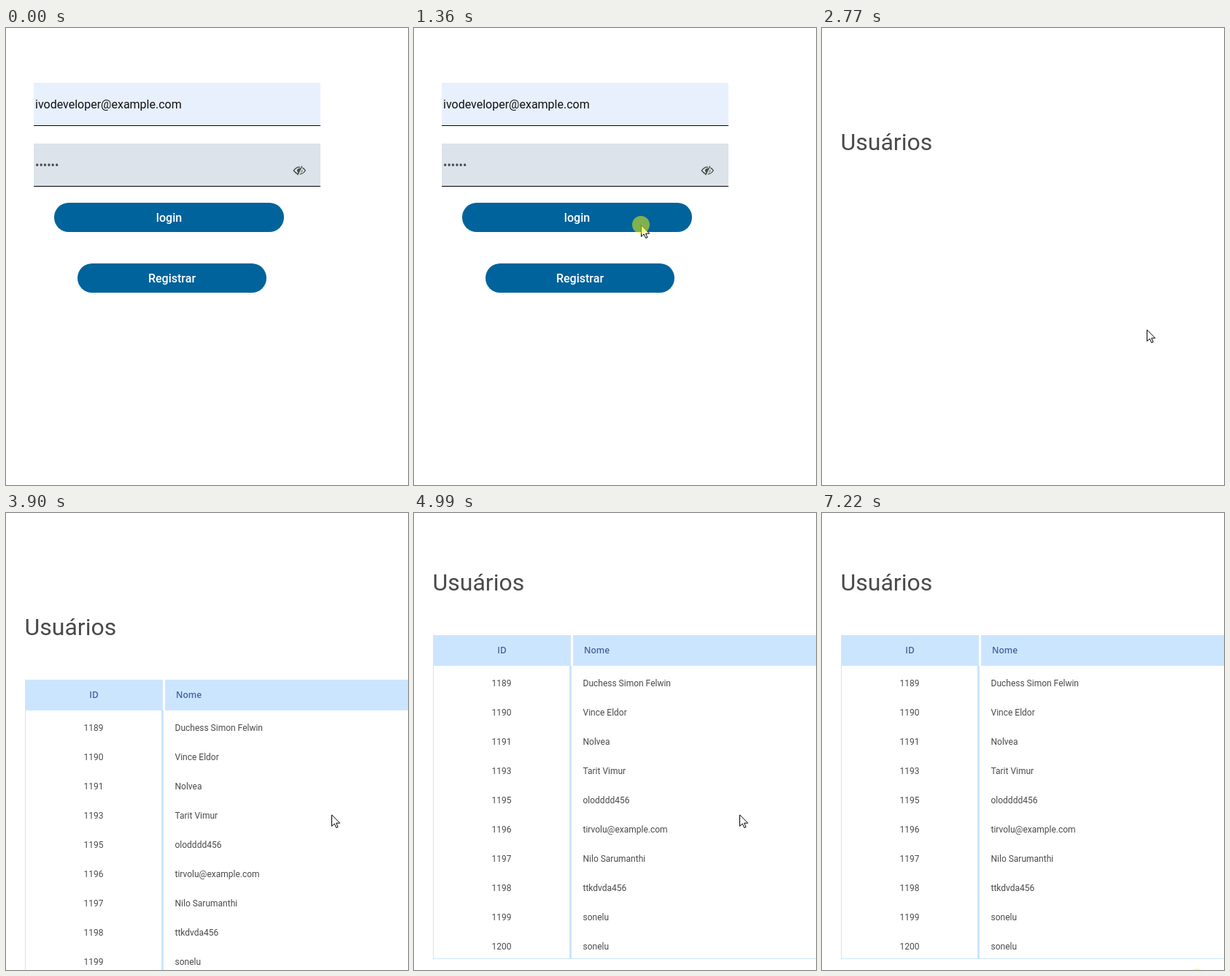
These frames come from a looping animation (551x625 px, 7.29 s). An HTML page:

```html
<!DOCTYPE html>
<html lang="pt">
<head>
<meta charset="utf-8">
<title>Login</title>
<style>
  html, body { margin: 0; width: 100%; height: 100%; overflow: hidden; background: #fff; }
  svg { display: block; width: 551px; height: 625px; overflow: hidden; }
  text { font: 16px Roboto, sans-serif; fill: #111; }
  .mid { text-anchor: middle; }
  .btn { fill: #00639c; }
  .btn.ok { fill: #007d00; }
  .label { font-weight: 500; fill: #fff; text-anchor: middle; }
  .title { font-size: 32px; fill: #4a4a4a; }
  .head { font: 600 12px "Open Sans", sans-serif; fill: #41619b; }
  .cell { font-size: 12px; fill: #4a4a4a; }
  .blue { fill: #cce5ff; }
</style>
</head>
<body>
<svg viewBox="0 0 551 625">
  <g id="login">
    <rect x="38" y="75" width="393" height="58" fill="#e8f0fe"/>
    <rect x="38" y="133" width="393" height="1"/>
    <text x="40" y="110">ivodeveloper@example.com</text>
    <rect x="38" y="158" width="393" height="58" fill="#dce3ea"/>
    <rect x="38" y="216" width="393" height="1"/>
    <text x="40" y="193" style="fill:#4a4a4a">••••••</text>
    <g fill="none" stroke="#45473f" stroke-width="1.3" stroke-linecap="round">
      <path d="M400 199.6Q397 198.6 394.3 195Q398 190 402.5 190.2M406.8 191.4Q409 192.8 410.3 195Q407.500 199.3 403.200 199.800"/>
      <path d="M405.600 189.300L399.800 200.600"/>
      <path d="M403 192Q399 192.300 399.300 195.500L400.500 197.500Z" fill="#45473f" stroke-width=".8"/>
      <path d="M406 194.500Q406 196.500 404.500 197.500" stroke-width="1"/>
    </g>
    <rect id="btn" class="btn" x="66" y="239" width="315" height="40" rx="20"/>
    <text id="label" class="label" x="223.5" y="265">login</text>
    <rect class="btn" x="98" y="322" width="259" height="40" rx="20"/>
    <text class="label" x="227.5" y="348">Registrar</text>
  </g>
  <g id="page">
    <text class="title" x="25.500" y="167">Usuários</text>
    <g id="table">
      <rect class="blue" x="26" y="228" width="189" height="42"/>
      <rect class="blue" x="218" y="228" width="333" height="42"/>
      <text class="head mid" x="120.5" y="253">ID</text>
      <text class="head" x="233" y="253">Nome</text>
      <rect class="blue" x="26" y="270" width="1" height="401"/>
      <rect class="blue" x="213" y="270" width="3" height="400"/>
      <rect class="blue" x="26" y="670" width="525" height="1"/>
    </g>
  </g>
  <path id="cursor" d="M.5 .8V16.300L4.200 12.900L6.700 18.400L9 17.400L6.600 12.100H11.700Z"
        fill="#fff" stroke="#000"/>
  <circle id="spot" r="12" fill="#ff0" fill-opacity=".5"/>
</svg>
<script>
const LOOP = 7290;
const $ = id => document.getElementById(id);
const show = (el, on) => el.style.display = on ? '' : 'none';

const users = [
  [1189, 'Duchess Simon Felwin'], [1190, 'Vince Eldor'], [1191, 'Nolvea'],
  [1193, 'Tarit Vimur'], [1195, 'olodddd456'], [1196, 'tirvolu@example.com'],
  [1197, 'Nilo Sarumanthi'], [1198, 'ttkdvda456'], [1199, 'sonelu'], [1200, 'sonelu']
];

function addCell(str, x, y, cls) {
  const el = document.createElementNS('http://www.w3.org/2000/svg', 'text');
  el.setAttribute('x', x);
  el.setAttribute('y', y);
  el.setAttribute('class', cls);
  el.textContent = str;
  $('table').append(el);
}
users.forEach(([id, name], i) => {
  addCell(id, 120, 298 + i * 40, 'cell mid');
  addCell(name, 231.5, 298 + i * 40, 'cell');
});

const smooth = p => p * p * (3 - 2 * p);
const easeOut = p => 1 - (1 - p) ** 1.6;

// Pointer moves: start, end, steps, first step index, from, to, easing
const moves = [
  [330, 1020, 10, 0, [498, 606], [314, 274], easeOut],
  [1090, 1160, 2, 1, [314, 274], [311, 269], p => p],
  [1510, 1780, 5, 1, [311, 269], [445, 412], smooth],
  [3900, 3900, 1, 1, [445, 412], [446, 412], p => p],
  [6110, 6800, 11, 1, [446, 412], [518, 624], smooth]
];
// Each entry holds from its time on
const labels = [[0, 'login'], [1450, 'carregando...'], [2510, 'Seja bem vindo!']];
const scrolls = [[0, 0], [4850, 14], [4920, 40], [4990, 61]];
const at = (table, t) => table.findLast(row => t >= row[0])?.[1];

function pointer(t) {
  const move = moves.findLast(m => t >= m[0]);
  if (!move || t >= 6870) return null;
  const [start, end, steps, first, from, to, ease] = move;
  const gap = (end - start) / (steps - first) || 1;
  const k = Math.min(steps, first + Math.floor((t - start) / gap + 0.01));
  const p = ease(k / steps);
  return from.map((v, i) => Math.round(v + (to[i] - v) * p));
}

function draw(t) {
  show($('login'), t < 2770);
  show($('page'), t >= 2770);
  show($('table'), t >= 3570);
  $('label').textContent = at(labels, t);
  $('btn').classList.toggle('ok', t >= 2510);
  $('page').setAttribute('transform', `translate(0 ${-at(scrolls, t)})`);

  const pos = pointer(t);
  show($('cursor'), pos);
  if (pos) $('cursor').setAttribute('transform', `translate(${pos})`);

  const click = t >= 1360 && t < 1450 ? [311, 269] : t >= 7220 ? [514, 635] : null;
  show($('spot'), click);
  if (click) $('spot').setAttribute('transform', `translate(${click})`);
}

const begin = performance.now();
function tick() {
  draw((performance.now() - begin) % LOOP);
  requestAnimationFrame(tick);
}
tick();
</script>
</body>
</html>
```
